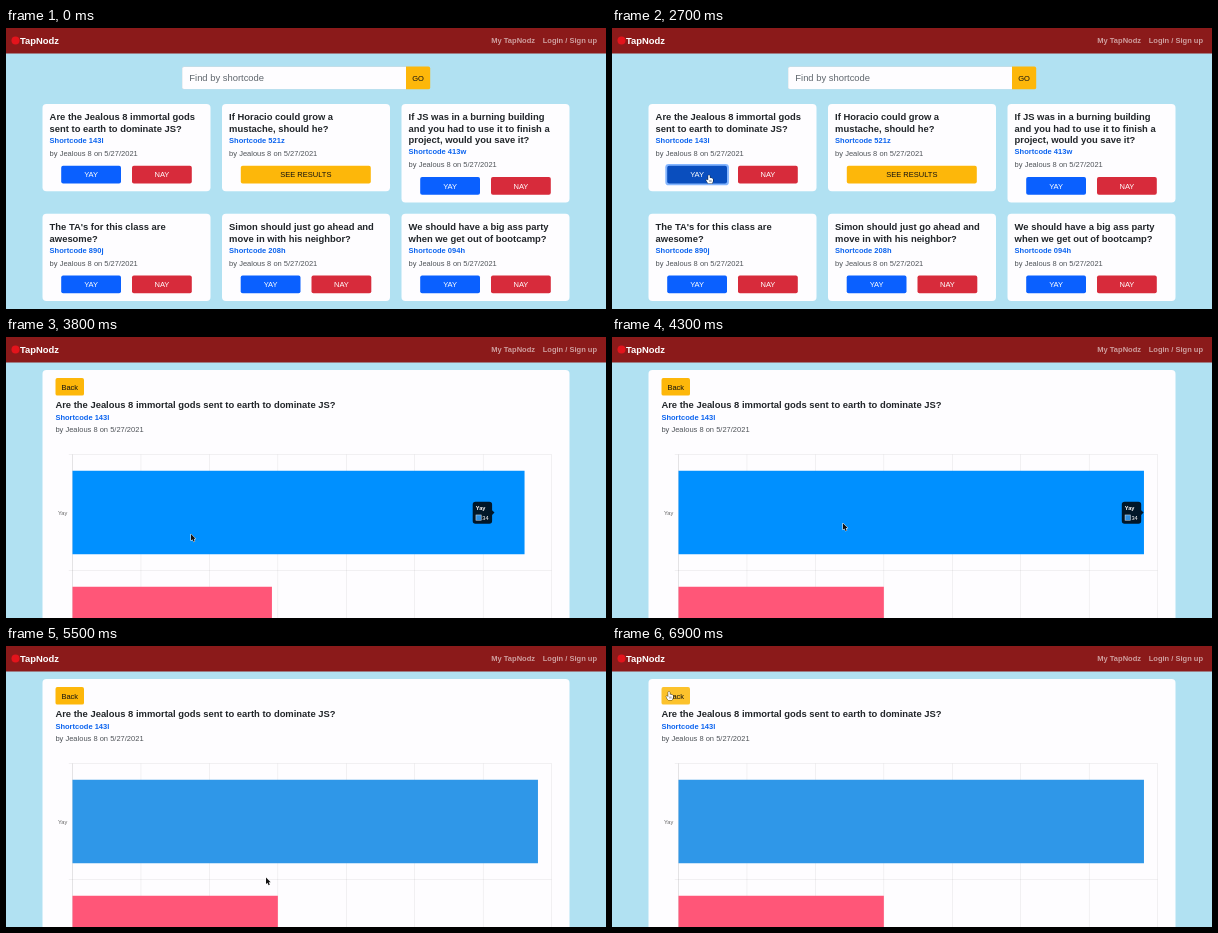
These frames come from a looping animation (600 px wide and 281 px high, 7000 ms). An HTML page with a canvas:

```html
<!DOCTYPE html>
<html lang="en">
<head>
<meta charset="utf-8">
<title>TapNodz</title>
<style>
  html, body { margin: 0; width: 100%; height: 100%; overflow: hidden; background: #b1e1f2; }
  canvas { display: block; width: 600px; height: 281px; }
</style>
</head>
<body>
<canvas id="stage"></canvas>
<script>
const W = 600, H = 281, LOOP = 7000;
const canvas = document.getElementById('stage');
const ctx = canvas.getContext('2d');
const dpr = window.devicePixelRatio || 1;
canvas.width = W * dpr;
canvas.height = H * dpr;

const FONT = '"Liberation Sans", Arial, sans-serif';
const BIG = 9.42, MID = 7.52, TINY = 5.64;
const COLOR = {
  sky: '#b1e1f2', nav: '#8b1a1a', card: '#fefdff', ink: '#212529', muted: '#50555a',
  link: '#0a63ef', blue: '#0a60ff', red: '#d72b3b', amber: '#fdb70a', pink: '#ff5678'
};
const BYLINE = 'by Jealous 8 on 5/27/2021';
const OPEN_AT = 3200, CLICK_AT = 2600;

const clamp = v => Math.min(1, Math.max(0, v));
const phase = (t, start, length) => clamp((t - start) / length);
const outQuart = p => 1 - (1 - p) ** 4;
const smooth = p => p * p * (3 - 2 * p);
const lerp = (a, b, p) => a + (b - a) * p;
const mix = (a, b, p) => `rgb(${a.map((v, i) => Math.round(lerp(v, b[i], p))).join(',')})`;

function box(x, y, w, h, r, fill) {
  ctx.beginPath();
  ctx.roundRect(x, y, w, h, r);
  ctx.fillStyle = fill;
  ctx.fill();
}

function text(str, x, y, size, fill, weight = 400, align = 'left') {
  ctx.font = `${weight} ${size}px ${FONT}`;
  ctx.textAlign = align;
  ctx.fillStyle = fill;
  ctx.fillText(str, x, y);
}

function button(label, x, y, w, fill, ink = '#fff') {
  box(x, y, w, 17.6, 1.9, fill);
  text(label, x + w / 2, y + 11.5, MID, ink, 400, 'center');
}

function nav() {
  box(0, 0, W, 25.5, 0, COLOR.nav);
  ctx.beginPath();
  ctx.arc(9.5, 12.5, 4, 0, 7);
  ctx.fillStyle = '#e3141c';
  ctx.fill();
  text('TapNodz', 14, 15.6, BIG, '#fff', 700);
  const faded = 'rgba(255,255,255,.58)';
  text('My TapNodz', 529, 15.2, MID, faded, 700, 'right');
  text('Login / Sign up', 591, 15.2, MID, faded, 700, 'right');
}

const CARDS = [
  { code: '143l', lines: ['Are the Jealous 8 immortal gods', 'sent to earth to dominate JS?'] },
  { code: '521z', lines: ['If Horacio could grow a', 'mustache, should he?'], done: true },
  { code: '413w', lines: ['If JS was in a burning building', 'and you had to use it to finish a', 'project, would you save it?'] },
  { code: '890j', lines: ["The TA's for this class are", 'awesome?'] },
  { code: '208h', lines: ['Simon should just go ahead and', 'move in with his neighbor?'] },
  { code: '094h', lines: ['We should have a big ass party', 'when we get out of bootcamp?'] }
];

function pollCard(card, i, t) {
  const x = 36.5 + (i % 3) * 179.5, y = i < 3 ? 76 : 185.8;
  const drop = (card.lines.length - 2) * 11.3;
  box(x, y, 168, 87.2 + drop, 4, COLOR.card);
  card.lines.forEach((line, n) => text(line, x + 7.1, y + 16.4 + n * 11.3, BIG, COLOR.ink, 700));
  text('Shortcode ' + card.code, x + 7.1, y + 39 + drop, MID, COLOR.link, 700);
  text(BYLINE, x + 7.1, y + 51.7 + drop, MID, COLOR.muted);

  const by = y + 61.8 + drop;
  if (card.done) {
    button('SEE RESULTS', x + 18.8, by, 130, COLOR.amber, '#111');
    return;
  }
  let fill = COLOR.blue;
  if (i === 0) {
    const press = phase(t, CLICK_AT, 100);
    fill = t < CLICK_AT
      ? mix([10, 96, 255], [10, 86, 215], phase(t, 1300, 150))
      : mix([10, 86, 215], [10, 78, 190], press);
    if (press) box(x + 16.8, by - 1.9, 63.6, 21.4, 3.4, `rgba(13,110,253,${0.5 * press})`);
  }
  button('YAY', x + 18.7, by, 59.8, fill);
  button('NAY', x + 89.5, by, 59.8, COLOR.red);
}

function listPage(t) {
  box(176, 38.5, 224, 22.8, [1.9, 0, 0, 1.9], '#d3dbe2');
  box(176.4, 38.9, 223.6, 22, [1.7, 0, 0, 1.7], COLOR.card);
  text('Find by shortcode', 183.3, 53.1, BIG, '#60676e');
  box(400, 38.5, 24.2, 22.8, [0, 1.9, 1.9, 0], COLOR.amber);
  text('GO', 412, 52.6, MID, '#111', 400, 'center');
  CARDS.forEach((card, i) => pollCard(card, i, t));
}

const CHART = { x: 66.5, top: 117.5, right: 545.6, row: 116, unit: 13.69 };

function tooltip(tip, alpha) {
  if (alpha <= 0) return;
  const x = tip - 21.8, y = 164.8;
  ctx.save();
  ctx.globalAlpha = alpha;
  ctx.beginPath();
  ctx.roundRect(x, y, 19.4, 22, 2.8);
  ctx.moveTo(x + 19.4, y + 8.4);
  ctx.lineTo(tip, y + 10.8);
  ctx.lineTo(x + 19.4, y + 13.2);
  ctx.fillStyle = 'rgba(0,0,0,.84)';
  ctx.fill();
  text('Yay', x + 3, y + 8.2, TINY, '#fff', 700);
  box(x + 3, y + 12.9, 5.8, 5.8, 0, '#dfe9f2');
  box(x + 3.5, y + 13.4, 4.8, 4.8, 0, '#2f8fe0');
  text('34', x + 9.6, y + 17.8, TINY, '#fff');
  ctx.restore();
}

function chart(t) {
  const { x, top, right, row, unit } = CHART;
  const line = 'rgba(0,0,0,.1)';
  for (let i = 0; i <= 7; i++) box(x - 0.25 + i * unit * 5, top, 0.5, H - top, 0, line);
  for (let i = 0; i < 2; i++) box(x - 3.8, top - 0.25 + i * row, right - x + 3.8, 0.5, 0, line);
  box(x - 0.25, top, 0.5, H - top, 0, line);
  text('Yay', 61.3, 177.5, TINY, '#666', 400, 'right');

  const grow = outQuart(phase(t, OPEN_AT + 13, 1000));
  const leave = 4736;
  const hover = t < leave ? phase(t, 3600, 150) : 1 - outQuart(phase(t, leave, 1000));
  box(x, 133.8, 34 * unit * grow, 83.4, 0, mix([47, 151, 232], [0, 144, 255], hover));
  box(x, 249.8, 15 * unit * grow, 83.4, 0, COLOR.pink);

  const tip = lerp(488.5, 531.6, outQuart(phase(t, 3810, 400)));
  tooltip(tip, phase(t, 3600, 180) * (1 - phase(t, leave, 200)));
}

function resultPage(t) {
  box(36.5, 33, 527, 260, 4, COLOR.card);
  const lit = phase(t, 6760, 130);
  button('Back', 49.5, 41, 28.5, mix([253, 183, 10], [252, 194, 44], lit), '#111');
  text(CARDS[0].lines.join(' '), 49.4, 71, BIG, COLOR.ink, 700);
  text('Shortcode 143l', 49.4, 82.5, MID, COLOR.link, 700);
  text(BYLINE, 49.4, 95.1, MID, COLOR.muted);
  chart(t);
}

// Pointer stops: time, x, y
const PATH = [
  [850, -12, 196], [1250, 109, 146], [1900, 109, 146], [2450, 97, 147], [3350, 97, 147],
  [3800, 185, 197], [4350, 232, 186], [4800, 240, 183], [5250, 260, 231.5], [6100, 260, 231.5], [6800, 57, 45.5]
];

function pointerAt(t) {
  const last = PATH[PATH.length - 1];
  const i = PATH.findIndex(p => p[0] > t);
  if (i === 0) return null;
  if (i < 0) return { x: last[1], y: last[2] };
  const a = PATH[i - 1], b = PATH[i];
  const p = smooth(phase(t, a[0], b[0] - a[0]));
  return { x: lerp(a[1], b[1], p), y: lerp(a[2], b[2], p) };
}

const ARROW = new Path2D('M0 0V6.6L1.5 5.2L2.6 7.7L3.8 7.2L2.7 4.8H4.7Z');
const HAND = new Path2D('M-.8 .6Q0 -.5 .8 .6V3Q1.5 2.5 2 3.2Q2.8 2.8 3.2 3.6Q4 3.4 4 4.4V6L3.2 8.4H-.9L-2.8 5.5Q-3 4.3 -1.9 4.5L-.8 5.5Z');

function pointer(t) {
  const p = pointerAt(t);
  if (!p) return;
  const overYay = t < OPEN_AT && p.x > 55 && p.x < 115 && p.y > 137 && p.y < 156;
  const overBack = t > 6000 && p.x < 78 && p.y < 59;
  const hand = overYay || overBack;
  ctx.save();
  ctx.translate(p.x, p.y);
  ctx.lineJoin = 'round';
  ctx.lineWidth = hand ? 0.8 : 1;
  ctx.strokeStyle = hand ? '#111' : '#fff';
  ctx.fillStyle = hand ? '#fff' : '#111';
  const shape = hand ? HAND : ARROW;
  ctx.stroke(shape);
  ctx.fill(shape);
  if (hand) {
    ctx.lineWidth = 0.4;
    ctx.stroke(new Path2D('M.8 5V7M2 5V7'));
  }
  ctx.restore();
}

const start = performance.now();

function draw(now) {
  const t = Math.max(0, now - start) % LOOP;
  ctx.setTransform(dpr, 0, 0, dpr, 0, 0);
  box(0, 0, W, H, 0, COLOR.sky);
  nav();
  if (t < OPEN_AT) listPage(t);
  else resultPage(t);
  pointer(t);
  requestAnimationFrame(draw);
}

draw(start);
</script>
</body>
</html>
```
